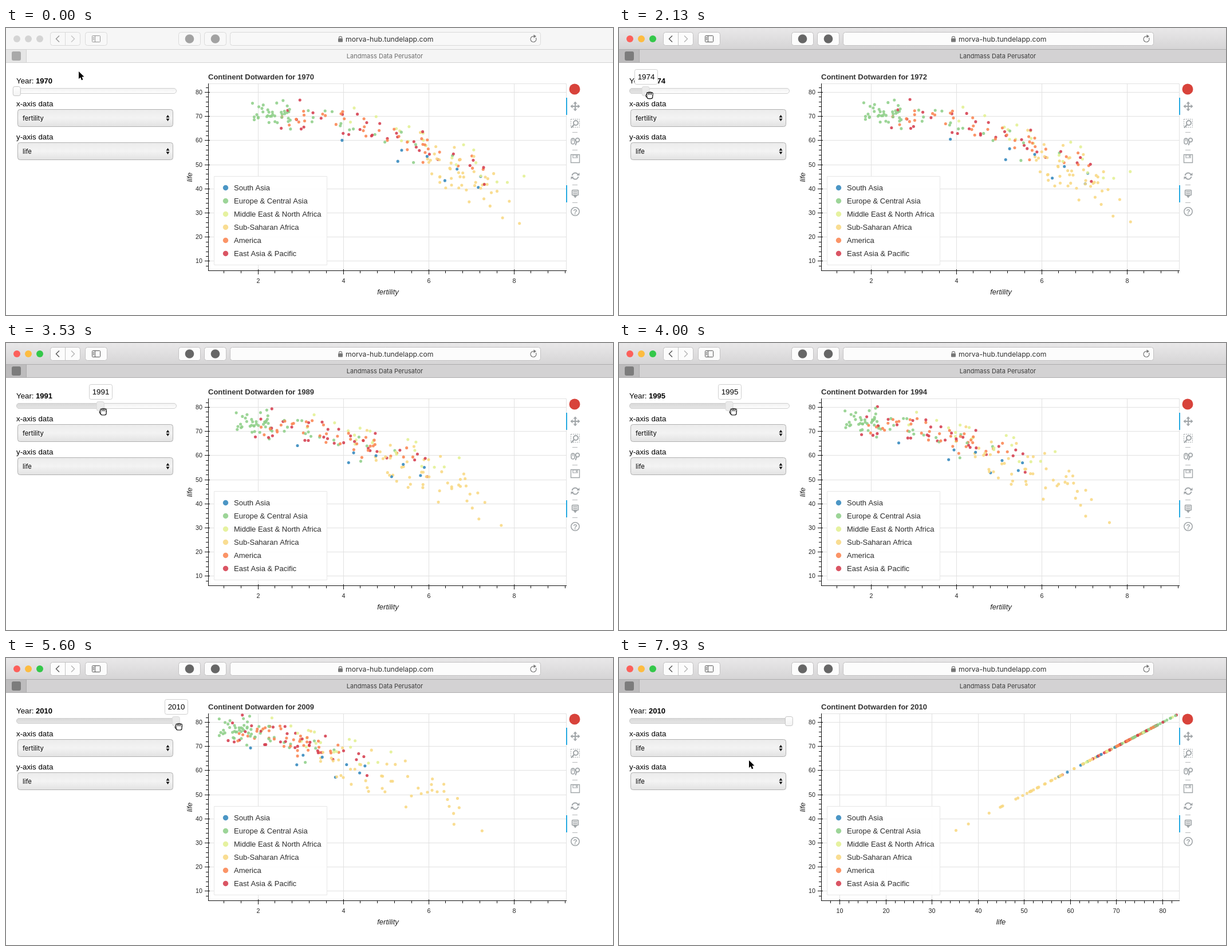
An HTML page with a canvas for the animation above (8 s loop, 1060 by 502 pixels).

```html
<!DOCTYPE html>
<html lang="en">
<head>
<meta charset="utf-8">
<title>Landmass Data Perusator</title>
<style>
html, body { margin: 0; width: 100%; height: 100%; overflow: hidden; background: #fff; }
canvas { display: block; }
</style>
</head>
<body>
<canvas id="stage" width="1060" height="502"></canvas>
<script>
const ctx = document.getElementById('stage').getContext('2d');
const LOOP = 8000;
const SANS = '"Liberation Sans", Arial, sans-serif';
const UI = 'Inter, "Open Sans", sans-serif';
const ICON = '#a1a6a9';

// ---------- helpers ----------
const clamp = (v, lo, hi) => Math.max(lo, Math.min(hi, v));
const mix = (a, b, k) => a + (b - a) * k;
const smooth = k => k * k * (3 - 2 * k);

function track(keys, t, ease = k => k) {
  if (t <= keys[0][0]) return keys[0].slice(1);
  for (let i = 1; i < keys.length; i++) {
    const [a, b] = [keys[i - 1], keys[i]];
    if (t <= b[0]) {
      const k = ease((t - a[0]) / (b[0] - a[0]));
      return a.slice(1).map((v, j) => mix(v, b[j + 1], k));
    }
  }
  return keys[keys.length - 1].slice(1);
}

function paint(fill, stroke, width = 1) {
  if (fill) { ctx.fillStyle = fill; ctx.fill(); }
  if (stroke) { ctx.strokeStyle = stroke; ctx.lineWidth = width; ctx.stroke(); }
}
function box(x, y, w, h, r, fill, stroke, width) {
  ctx.beginPath();
  ctx.roundRect(x, y, w, h, r);
  paint(fill, stroke, width);
}
function disc(x, y, r, fill, stroke, width) {
  ctx.beginPath();
  ctx.arc(x, y, r, 0, 7);
  paint(fill, stroke, width);
}
function line(color, width, ...p) {
  ctx.beginPath();
  for (let i = 0; i < p.length; i += 2) ctx.lineTo(p[i], p[i + 1]);
  paint(null, color, width);
}
function poly(fill, ...p) {
  ctx.beginPath();
  for (let i = 0; i < p.length; i += 2) ctx.lineTo(p[i], p[i + 1]);
  ctx.closePath();
  paint(fill);
}
function text(s, x, y, font, color = '#000', align = 'left') {
  ctx.font = font;
  ctx.fillStyle = color;
  ctx.textAlign = align;
  ctx.fillText(s, x, y);
}
function shade(y0, y1, ...colors) {
  const g = ctx.createLinearGradient(0, y0, 0, y1);
  colors.forEach((c, i) => g.addColorStop(i / (colors.length - 1), c));
  return g;
}
function turned(x, y, angle, fn) {
  ctx.save();
  ctx.translate(x, y);
  ctx.rotate(angle);
  fn();
  ctx.restore();
}
let seed = 20;
function rnd() {
  seed = (seed * 16807) % 2147483647;
  return seed / 2147483647;
}
const jitter = size => (rnd() + rnd() - 1) * size;

// ---------- data ----------
// first, last: fertility range in 1970 and 2010; lift: life above the world curve
const REGIONS = [
  { name: 'South Asia', color: '#3288bd', n: 8, first: [4.4, 7.7], last: [2.2, 4.8], skew: 1, spread: 6, lift: -4.5 },
  { name: 'Europe & Central Asia', color: '#8fcf8a', n: 52, first: [2.3, 6.5], last: [1.5, 3.6], skew: 5, spread: 5.6, lift: 0 },
  { name: 'Middle East & North Africa', color: '#e3f093', n: 20, first: [3.8, 8], last: [1.9, 4.8], skew: .8, spread: 9, lift: 5 },
  { name: 'Sub-Saharan Africa', color: '#f8d883', n: 47, first: [6, 7.7], last: [3.3, 6.9], skew: 1, spread: 13, lift: -4 },
  { name: 'America', color: '#fa8552', n: 36, first: [2.6, 7], last: [1.7, 3.5], skew: 1, spread: 6, lift: 1 },
  { name: 'East Asia & Pacific', color: '#d53e4f', n: 31, first: [2.4, 7.1], last: [1.2, 4.2], skew: 1, spread: 9, lift: 0 }
];

// life expectancy bends down with fertility at first, later it falls evenly
const worldLife = (fert, k) => mix(72.5 - .7 * (fert - 1) ** 2, 80 - 5 * (fert - 1), k);

const points = REGIONS.flatMap(({ color, n, first, last, skew, spread, lift }) =>
  Array.from({ length: n }, (_, i) => {
    const u = ((i + rnd()) / n) ** skew;
    return {
      color, order: rnd(),
      f0: mix(...first, u), f1: mix(...last, u),
      df: jitter(.6), dl: lift + jitter(spread)
    };
  })).sort((a, b) => a.order - b.order);

function place(p, year) {
  const k = (year - 1970) / 40;
  const base = mix(p.f0, p.f1, k);
  return [Math.max(.9, base + p.df), Math.min(83, worldLife(base, k) + p.dl)];
}

const AXES = {
  fertility: { px: v => 440 + (v - 2) * 74.5, major: 2, last: 8 },
  life: { px: v => 385.5 + (v - 10) * 8.054, major: 10, last: 80 }
};
const lifeY = v => 112.5 + (80 - v) * 4.22;
const snap = v => Math.floor(v) + .5;

// ---------- timeline ----------
const ACTIVE = 470, GRAB = 1620, DRAG = 1800, DROP = 5700, LET_GO = 5780;
const OPEN = 6270, PICK = 7130, REPLOT = 7330, LAG = 150;
const DRIVE = [[DRAG, 1970], [2730, 1982], [3530, 1991], [4730, 2002], [5550, 2010]];
const ARROW = [[0, 127, 76], [650, 127, 76], [1330, 39, 115], [GRAB, 22, 114]];
const RETURN = [[LET_GO, 300, 116], [6150, 228, 160], [6400, 227, 162], [6750, 227, 179]];
const yearAt = t => track(DRIVE, t)[0];
const sliderX = year => 18.8 + (year - 1970) * 6.95;

// ---------- browser window ----------
function chrome(on) {
  ctx.fillStyle = on ? shade(0, 38, '#e9e8e9', '#d5d4d5') : '#f6f6f6';
  ctx.fillRect(0, 0, 1060, 38);
  ctx.fillStyle = on ? '#d3d2d3' : '#f5f5f5';
  ctx.fillRect(0, 38, 1060, 22);
  ctx.fillStyle = on ? '#bdbcbd' : '#e6e6e6';
  ctx.fillRect(0, 38, 35, 22);
  const rule = on ? '#adacad' : '#d2d2d2';
  line(rule, 1, 0, 37.5, 1060, 37.5);
  line(rule, 1, 35.5, 38, 35.5, 60);
  line(rule, 1, 0, 60.5, 1060, 60.5);

  ['#fc605b', '#fdbc40', '#34c84a'].forEach((c, i) =>
    disc(19 + 20 * i, 19, 6, on ? c : '#d4d4d4'));

  const face = on ? '#fcfcfc' : '#f8f8f8', edge = on ? '#c3c2c3' : '#dadada';
  const ink = on ? '#555' : '#969696';
  for (const [x, w] of [[77.5, 52], [138.5, 38], [301.5, 38], [346.5, 38], [391.5, 542]])
    box(x, 7.5, w, 23, 4, face, edge);
  line(edge, 1, 103.5, 8, 103.5, 30);
  line(ink, 1.4, 93, 13.5, 87.5, 19, 93, 24.5);
  line(on ? '#b4b4b4' : '#c4c4c4', 1.4, 114, 13.5, 119.5, 19, 114, 24.5);
  box(150.5, 13.5, 14, 11, 1, null, ink);
  line(ink, 1, 155.5, 14, 155.5, 24);
  for (const y of [16.5, 18.5, 20.5]) line(ink, 1, 152, y, 154, y);
  for (const x of [320.5, 365.5]) disc(x, 19, 7.8, on ? '#666' : '#a2a2a2');

  box(580, 18, 8, 6.5, 1, '#777');
  ctx.beginPath();
  ctx.arc(584, 17.5, 2.6, Math.PI, 0);
  paint(null, '#777', 1.3);
  text('morva-hub.tundelapp.com', 593, 24, '12.2px ' + UI, '#333');
  ctx.beginPath();
  ctx.arc(921, 19.5, 5, -.5, 4.9);
  paint(null, '#777', 1.2);
  poly('#777', 921.5, 11.5, 926, 14.5, 921.5, 17.5);

  box(10, 41, 16, 16, 3, on ? '#7c7c7c' : '#a9a9a9');
  text('Landmass Data Perusator', 661.5, 53, '11px ' + UI, on ? '#3c3c3c' : '#6e6e6e', 'center');
}

// ---------- form ----------
function slider(year, drag) {
  const x = sliderX(year), tip = Math.round(x);
  text('Year:', 18, 97, '13.3px ' + SANS);
  text(year, 52, 97, 'bold 13px ' + SANS);
  box(18.5, 105.5, 279, 9, 4.5, shade(105, 115, '#f0f0f0', '#fff'), '#cfcfcf');
  if (x > 24) box(18.5, 105.5, x - 18.5, 9, 4.5, shade(105, 115, '#d8d8d8', '#e6e6e6'), '#cfcfcf');
  box(x - 6.5, 102.5, 13, 16, 3, drag ? '#ebebeb' : shade(102, 119, '#fff', '#f3f3f3'), drag ? '#dadada' : '#c4c4c4');
  if (drag) {
    box(tip - 19.5, 72.5, 40, 26, 3, '#fff', '#cfcfcf');
    text(year, tip + .5, 90, '13.3px ' + SANS, '#000', 'center');
  }
}

function select(label, value, y, focus) {
  text(label, 18, y - 5, '13.3px ' + SANS);
  box(20.5, y + .5, 271, 30, 4, shade(y, y + 31, '#ebebeb', '#f3f3f3', '#e2e2e2'), focus ? '#62a3e0' : '#b0b0b0');
  text(value, 29, y + 20, '11.2px ' + UI);
  poly('#111', 279.5, y + 14.5, 282.5, y + 10, 285.5, y + 14.5);
  poly('#111', 279.5, y + 16.5, 282.5, y + 21, 285.5, y + 16.5);
}

function menu(t, cursorY) {
  ctx.save();
  ctx.globalAlpha = 1 - clamp((t - PICK) / 150, 0, 1);
  ctx.shadowColor = 'rgba(0,0,0,.4)';
  ctx.shadowBlur = 8;
  ctx.shadowOffsetY = 3;
  box(7, 146, 272, 72, 4, '#f1f1f1');
  ctx.shadowColor = 'transparent';
  box(6.5, 145.5, 273, 73, 4, null, 'rgba(0,0,0,.2)');
  const blink = t > 7000 && t < 7060;
  const row = blink ? -1 : clamp(Math.floor((cursorY - 150) / 16), 0, 3);
  if (row >= 0) {
    ctx.fillStyle = '#398df6';
    ctx.fillRect(7, 150 + 16 * row, 272, 16);
  }
  ['fertility', 'life', 'child_mortality', 'gdp'].forEach((s, i) =>
    text(s, 28, 162 + 16 * i, '11.2px ' + UI, i === row ? '#fff' : '#111'));
  line(row === 0 ? '#fff' : '#111', 1.5, 13, 158.5, 15.5, 161.5, 19.5, 154);
  ctx.restore();
}

// ---------- plot ----------
function plot(year, xName) {
  const axis = AXES[xName], tick = '10.7px ' + SANS, ink = '#222';
  text('Continent Dotwarden for ' + year, 353, 90, 'bold 13px ' + SANS, '#333');

  for (let v = axis.major; v <= axis.last; v += axis.major) {
    const x = snap(axis.px(v));
    line('#e1e1e1', 1, x, 98, x, 424);
  }
  for (let v = 10; v <= 80; v += 10) {
    const y = snap(lifeY(v));
    line('#e1e1e1', 1, 354, y, 978, y);
  }
  box(353.5, 97.5, 625, 327, 0, null, '#e1e1e1');

  ctx.globalAlpha = .88;
  for (const p of points) {
    const [fert, life] = place(p, year);
    disc(axis.px(xName === 'life' ? life : fert), lifeY(life), 2.55, p.color);
  }
  ctx.globalAlpha = 1;

  line('#111', 1, 353.5, 97, 353.5, 425);
  line('#111', 1, 353, 424.5, 979, 424.5);
  for (let i = 1; i < 60; i++) {
    const big = i % 5 === 0, v = i * axis.major / 5;
    const x = snap(axis.px(v)), y = snap(lifeY(i * 2));
    if (x > 354 && x < 979) {
      line('#111', 1, x, big ? 422 : 425, x, big ? 431 : 429);
      if (big) text(v, x, 446, tick, ink, 'center');
    }
    if (y > 97 && y < 424) {
      line('#111', 1, big ? 347 : 349, y, big ? 356 : 354, y);
      if (big) text(i * 2, 343, y + 3.5, tick, ink, 'right');
    }
  }
  text(xName, 667, 466, 'italic 13px ' + SANS, ink, 'center');
  turned(325, 261, -Math.PI / 2, () => text('life', 0, 0, 'italic 13px ' + SANS, ink, 'center'));

  box(363.5, 259.5, 197, 155, 0, 'rgba(255,255,255,.95)', '#e6e6e6');
  REGIONS.forEach(({ name, color }, i) => {
    const y = 279.5 + 23 * i;
    ctx.globalAlpha = .88;
    disc(383.5, y, 4.7, color);
    ctx.globalAlpha = 1;
    text(name, 398, y + 4.5, '13px ' + SANS, '#2c2c2c');
  });
}

function toolbar() {
  disc(993, 107, 9.5, '#d8433b');
  ctx.fillStyle = '#26aae1';
  ctx.fillRect(978, 122, 2, 30);
  ctx.fillRect(978, 275, 2, 30);
  for (const y of [182.5, 213.5, 274.5, 305.5]) line('#b4b7b9', 1, 989, y, 998, y);

  // pan
  line(ICON, 2, 988, 137, 1000, 137);
  line(ICON, 2, 994, 131, 994, 143);
  for (let i = 0; i < 4; i++)
    turned(994, 137, i * Math.PI / 2, () => poly(ICON, -3.5, -4.5, 0, -8.5, 3.5, -4.5));
  // box zoom
  ctx.setLineDash([2, 1.5]);
  box(986.5, 159.5, 15, 14, 0, null, ICON);
  ctx.setLineDash([]);
  disc(995, 166, 4, '#fff', ICON, 2);
  line(ICON, 2.4, 992, 169, 987, 174.5);
  // wheel zoom
  box(987, 193, 6, 10, 3, null, ICON, 1.6);
  line(ICON, 1.4, 990, 194, 990, 198);
  disc(998, 196, 3.3, null, ICON, 1.8);
  line(ICON, 2, 996.5, 199, 994.5, 205);
  // save
  box(986.5, 221.5, 15, 14, 0, null, ICON, 1.4);
  box(990, 222, 8, 5, 0, null, ICON, 1.2);
  line(ICON, 1.5, 996, 223, 996, 226);
  // reset
  for (const angle of [0, Math.PI]) turned(994, 259, angle, () => {
    ctx.beginPath();
    ctx.arc(0, 0, 5.5, Math.PI * 1.05, Math.PI * 1.85);
    paint(null, ICON, 2);
    poly(ICON, 2.5, -1, 7.5, -1, 7.5, -6);
  });
  // hover
  box(988.5, 283.5, 11, 9, 1, '#e3e4e5', ICON, 1.4);
  poly(ICON, 990.5, 293, 997.5, 293, 994, 297.5);
  for (const y of [286.5, 289.5]) line(ICON, 1, 990.5, y, 997.5, y);
  // help
  disc(994, 321, 7.2, null, ICON, 1.6);
  text('?', 994, 325.5, 'bold 12px ' + SANS, ICON, 'center');
}

// ---------- cursors ----------
function arrow(x, y) {
  turned(x, y, 0, () => {
    ctx.beginPath();
    for (const [px, py] of [[0, 0], [0, 13], [3, 10.3], [5, 15.3], [7.4, 14.3], [5.4, 9.4], [9.4, 9.3]]) ctx.lineTo(px, py);
    ctx.closePath();
    ctx.lineJoin = 'round';
    paint(null, '#fff', 2.4);
    paint('#000');
  });
}
function fist(x, y) {
  turned(x, y, 0, () => {
    for (let i = 0; i < 4; i++) box(-4.5 + i * 2.6, -5.5 + (i % 3 ? 0 : .8), 2.8, 6, 1.4, '#fff', '#000', 1.1);
    box(-6, -1.2, 4, 4.4, 1.6, '#fff', '#000', 1.1);
    box(-4.2, -1, 10, 7, 3, '#fff', '#000', 1.1);
    ctx.fillStyle = '#fff';
    ctx.fillRect(-3.6, -2.6, 8.8, 4);
    for (const dx of [-1.5, 1, 3.5]) line('#000', .9, dx, -3.5, dx, -.5);
  });
}

// ---------- frame ----------
function draw(t) {
  const drive = yearAt(t);
  const late = t >= LET_GO;
  const [cx, cy] = track(late ? RETURN : ARROW, t, smooth);
  const open = t >= OPEN && t < PICK + 150;

  ctx.fillStyle = '#fff';
  ctx.fillRect(0, 0, 1060, 502);
  chrome(t >= ACTIVE);
  plot(Math.round(yearAt(t - LAG)), t < REPLOT ? 'fertility' : 'life');
  toolbar();
  slider(Math.round(drive), t >= DRAG && t < DROP);
  select('x-axis data', t < PICK ? 'fertility' : 'life', 142, open);
  select('y-axis data', 'life', 200, false);
  if (open) menu(t, cy);
  if (t >= GRAB && !late) fist(sliderX(drive) + 4.5, track([[DRAG, 117], [3400, 120]], t)[0]);
  else arrow(cx, cy);
}

const start = performance.now();
function tick() {
  draw((performance.now() - start) % LOOP);
  requestAnimationFrame(tick);
}
tick();
</script>
</body>
</html>
```
